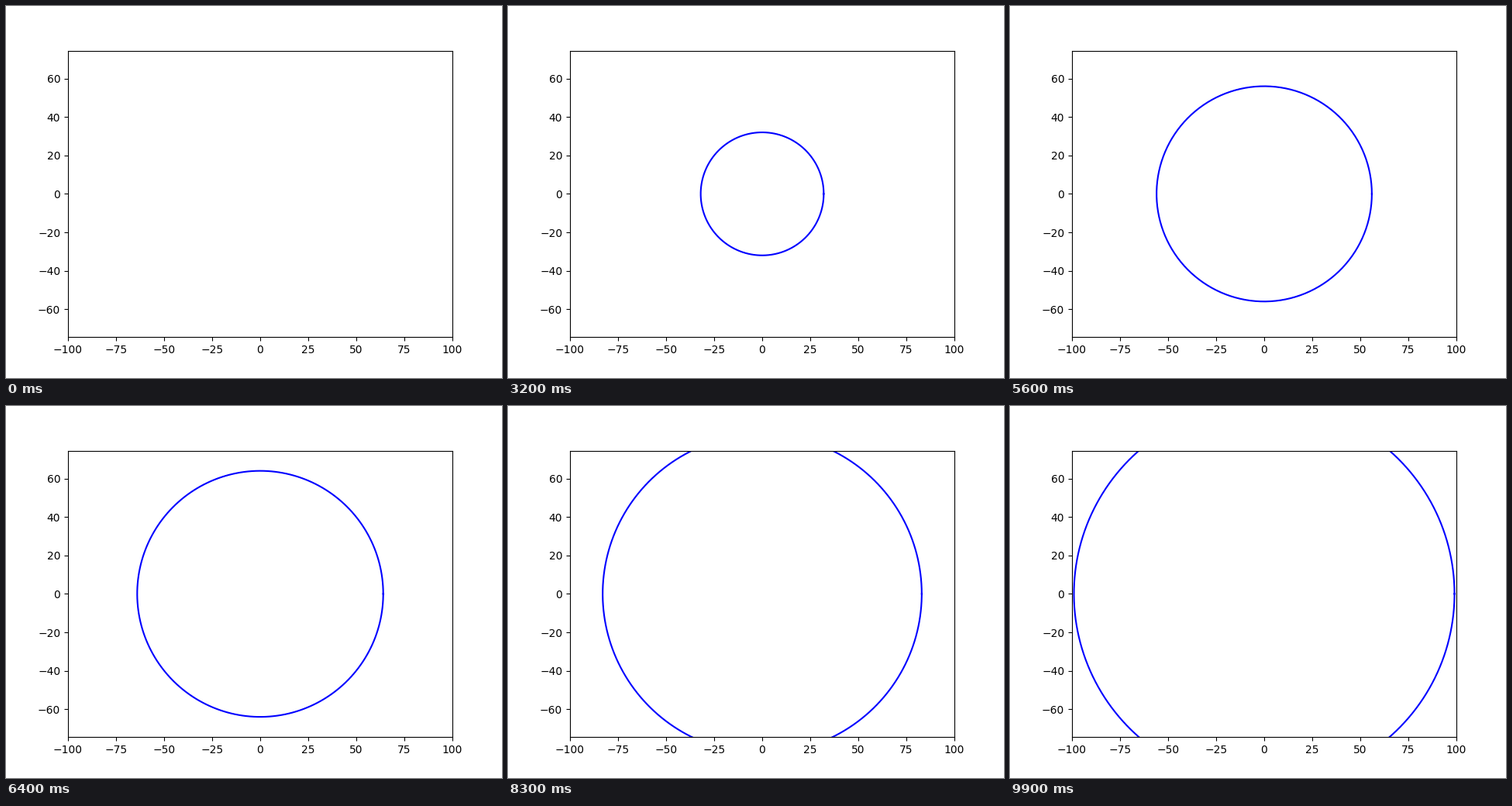
A matplotlib script for the animation above (10 s loop, 640 by 480 pixels).

```python
import matplotlib.pyplot as plt
import numpy as np
from matplotlib.animation import FuncAnimation

FRAMES = 100
INTERVAL = 100  # ms

fig, ax = plt.subplots(figsize=(6.4, 4.8), dpi=100)
ax.set_xlim(-100, 100)

# Equal scale on both axes within the default axes box
box = ax.get_position()
half = 100 * (box.height * 4.8) / (box.width * 6.4)
ax.set_ylim(-half, half)

theta = np.linspace(0, 2 * np.pi, 400)
cos, sin = np.cos(theta), np.sin(theta)
(circle,) = ax.plot([], [], color="blue", lw=1.5)


def update(radius):
    circle.set_data(radius * cos, radius * sin)
    circle.set_visible(radius > 0)
    return (circle,)


anim = FuncAnimation(fig, update, frames=FRAMES, interval=INTERVAL,
                     init_func=lambda: update(0), repeat=True, repeat_delay=0)
plt.show()
```
